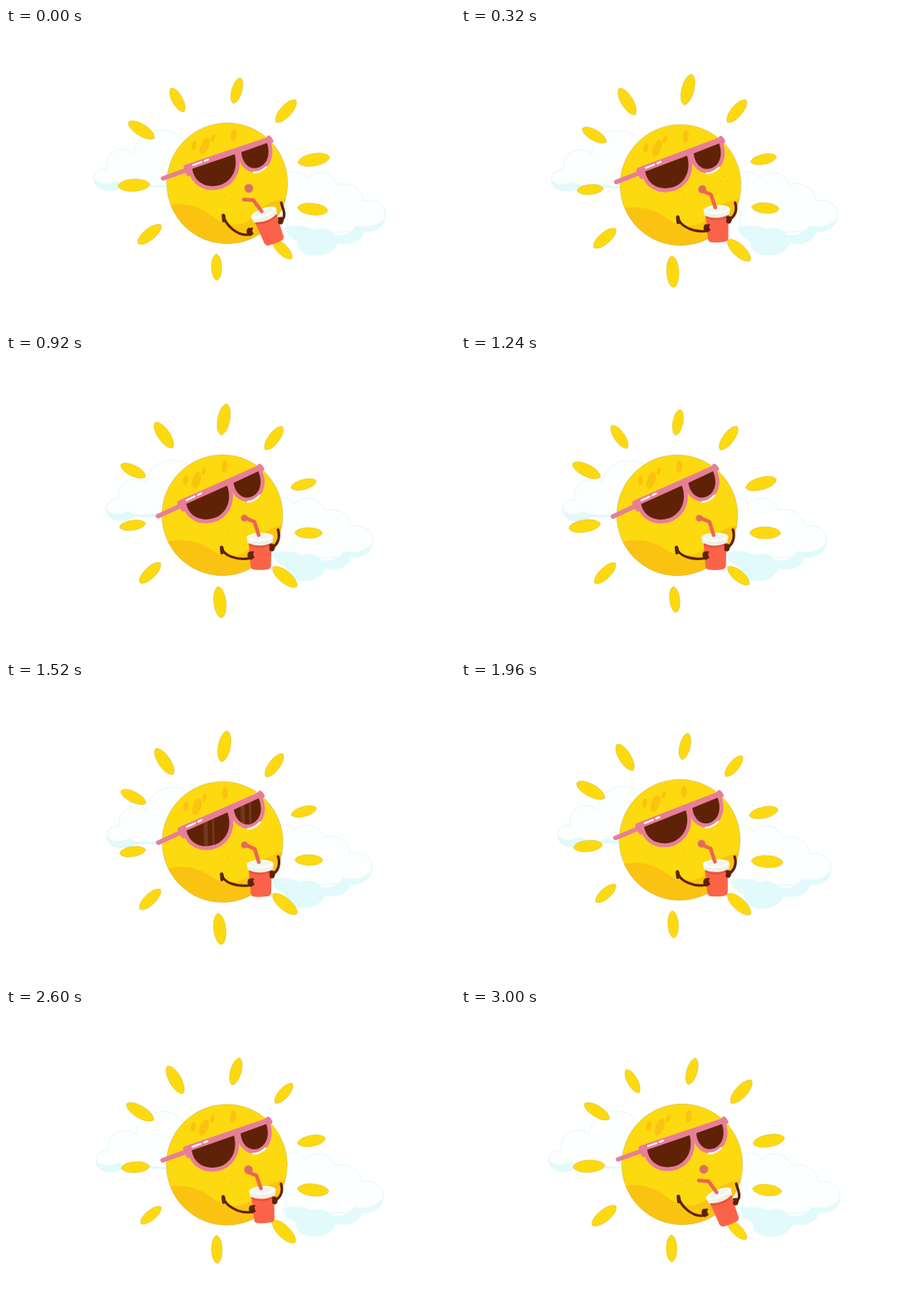
Animation, 540 px wide and 360 px high, one loop 3.04 s. Source, as an HTML page with a canvas:

```html
<!DOCTYPE html>
<html lang="en">
<head>
<meta charset="utf-8">
<title>Sipping sun</title>
<style>
html, body { margin: 0; width: 100%; height: 100%; overflow: hidden; background: #fff; }
canvas { display: block; width: 540px; height: 360px; }
</style>
</head>
<body>
<canvas id="stage"></canvas>
<script>
const LOOP = 3040, STEP = 40, TAU = Math.PI * 2;
const YELLOW = '#fdd90f', AMBER = '#fbc311', PINK = '#e77e98', BROWN = '#5f2206',
      RED = '#fb6349', STRAW = '#ee6451', ICE = '#e2fafc', RIM = '#d8f6f7', WHITE = '#fdfefe';

const canvas = document.getElementById('stage');
const ctx = canvas.getContext('2d');
const dpr = window.devicePixelRatio || 1;
canvas.width = 540 * dpr;
canvas.height = 360 * dpr;

const rad = d => d * Math.PI / 180;
const mix = (a, b, k) => a + (b - a) * k;
const clamp = x => Math.max(0, Math.min(1, x));
const smooth = x => { x = clamp(x); return x * x * (3 - 2 * x); };

// Smooth curve through [time, value] keys, at rest at both ends
function track(keys, t) {
  let i = 0;
  while (i < keys.length - 2 && t >= keys[i + 1][0]) i++;
  const slope = j => {
    if (j === 0 || j === keys.length - 1) return 0;
    const a = keys[j - 1], b = keys[j + 1];
    return (b[1] - a[1]) / (b[0] - a[0]);
  };
  const [t0, v0] = keys[i], [t1, v1] = keys[i + 1];
  const d = t1 - t0, u = (t - t0) / d, w = 1 - u;
  return v0 * (1 + 2 * u) * w * w + slope(i) * d * u * w * w
       + v1 * u * u * (3 - 2 * u) - slope(i + 1) * d * u * u * w;
}

const SWAY = [[0, 0], [320, .33], [920, .97], [1220, 1], [1520, .93], [1960, .5], [2240, .28], [2640, .07], [LOOP, 0]];
const DRIFT = [[0, 0], [320, .18], [600, .48], [920, .91], [1240, 1], [1520, .97], [1960, .65], [2240, .41], [2640, .12], [LOOP, 0]];

// Counter-clockwise from the top: inner end x, y and direction
const RAYS = [
  [7.2, -96.2, -74], [-52, -86.2, -119], [-87.7, -54.6, 211.6], [-93, 1.2, 177], [-79.5, 50.2, 141],
  [-13, 85, 89], [54.7, 67.7, 45], [84.8, 29.2, 6], [85.3, -25, -10], [58.8, -73.7, -48]
];

function placed(x, y, deg, draw) {
  ctx.save();
  ctx.translate(x, y);
  ctx.rotate(rad(deg));
  draw();
  ctx.restore();
}

function fill(d, color) {
  ctx.fillStyle = color;
  ctx.fill(new Path2D(d));
}

function line(d, color, width) {
  ctx.strokeStyle = color;
  ctx.lineWidth = width;
  ctx.stroke(new Path2D(d));
}

function oval(x, y, rx, ry, deg, color) {
  ctx.fillStyle = color;
  ctx.beginPath();
  ctx.ellipse(x, y, rx, ry, rad(deg), 0, TAU);
  ctx.fill();
}

const LEFT_CLOUD = 'M106 183 C105 174 112 169 121 170 C119 157 126 146 140 146 C147 146 151 148 154 151 C156 132 170 123 186 123 C204 123 216 134 216 150 L216 192 L140 190 C134 197 108 200 106 183Z';
const LEFT_SHADE = 'M106 182 C112 189 124 189 132 184 C142 190 158 190 166 186 C176 191 190 191 200 188 L200 192 L140 191 C134 197 108 200 106 182Z';
const RIGHT_CLOUD = 'M335 176 C345 171 357 173 362 181 C375 169 394 174 398 189 C414 184 429 194 430 208 C446 206 457 214 456 225 C456 238 444 244 430 244 L340 250Z';
const RIGHT_SHADE = 'M335 240 C350 237 362 238 370 243 C380 239 389 242 395 249 C407 251 417 246 421 238 C435 241 448 238 456 228 C456 239 444 247 430 246 C428 257 414 263 399 259 C395 270 383 275 371 274 C358 274 350 267 351 257 C344 255 338 250 335 240Z';

function drawClouds(k) {
  placed(16 * k, 4 * k, 0, () => {
    fill(LEFT_CLOUD, WHITE);
    fill(LEFT_SHADE, ICE);
    line(LEFT_CLOUD, RIM, .8);
  });
  placed(-16.5 * k, -2 * k, 0, () => {
    fill(RIGHT_CLOUD, WHITE);
    line(RIGHT_CLOUD, RIM, .8);
    fill(RIGHT_SHADE, ICE);
  });
}

function drawRays(t) {
  const beat = t / LOOP * 5;
  RAYS.forEach(([x, y, deg], i) => {
    const len = 35 + 3.5 * Math.cos(TAU * (beat - .58 + i * .2));
    const b = len * .26;
    const d = `M0 0 C${len * .08} ${-b} ${len * .92} ${-b} ${len} 0 C${len * .92} ${b} ${len * .08} ${b} 0 0Z`;
    placed(x, y, deg, () => {
      fill(d, YELLOW);
      line(d, 'rgba(190,165,60,.4)', .7);
    });
  });
}

const LENSES = [
  'M-42 -17.5 L9 -35 C13 -20 8 -4 -8 2 C-26 7 -40 -2 -42 -17.5Z',
  'M17 -37.5 L48 -48.5 C52 -36 49 -24 39 -19.5 C28 -15 18 -23 17 -37.5Z'
];

function drawGlasses(t) {
  line('M-77 -6 L-46 -17', PINK, 5.5);
  line('M50 -55 L53 -51', PINK, 5);
  line('M-49 -18 L-46 -12', PINK, 6.5);
  const sweep = (t - 1360) / 340;
  const glow = .15 * Math.sin(Math.PI * clamp(sweep));
  LENSES.forEach(d => line(d, PINK, 9.5));
  line('M-49 -19.5 L51 -53', PINK, 6.5);
  LENSES.forEach((d, i) => {
    fill(d, BROWN);
    if (glow <= 0) return;
    ctx.save();
    ctx.clip(new Path2D(d));
    const x = mix(-50, 12, sweep) + i * 45;
    line(`M${x} 15 L${x + 5} -60`, `rgba(235,180,150,${glow})`, 5);
    line(`M${x + 9} 15 L${x + 14} -60`, `rgba(235,180,150,${glow})`, 2.5);
    ctx.restore();
  });
  line('M-41 -22 L-31 -25.5 M-27 -27 L-23 -28.5', '#fff', 2.3);
  line('M32 -13 Q40 -13 47 -19.5', '#fff', 2.3);
}

function drawSun(t, sway) {
  drawRays(t);
  oval(0, 0, 72.7, 72.7, 0, YELLOW);
  ctx.save();
  ctx.clip();
  fill('M-75 27 C-54 22 -34 26 -16 41 C-2 53 22 53 34 38 C40 28 52 21 75 18 L75 80 L-75 80Z', AMBER);
  ctx.restore();
  ctx.strokeStyle = 'rgba(190,175,90,.55)';
  ctx.lineWidth = .8;
  ctx.beginPath();
  ctx.arc(0, 0, 72.7, 0, TAU);
  ctx.stroke();

  oval(-27, -45, 5, 10.5, 22, AMBER);
  oval(-40, -46, 3, 6, 12, AMBER);
  oval(-17, -55, 2.3, 4.5, 22, AMBER);
  oval(8, -58, 3.6, 7.5, 8, AMBER);
  [[-2, 16], [5, 19], [4, 12], [48, -4], [53, -9], [56, -2]].forEach(([x, y]) => oval(x, y, 1, 1, 0, '#f8c622'));

  drawGlasses(t);
  const r = mix(5.5, 4.3, sway);
  oval(26, 6, r, r, 0, '#e38a5c');
  oval(26, 6, r - 1, r - 1, 0, '#d96f62');
}

function drawCup() {
  fill('M-13.8 5 L13.8 5 L12.3 34 Q11.8 38 8 38.5 Q0 39.5 -8 38.5 Q-11.8 38 -12.3 34Z', RED);
  fill('M-13.8 7 Q0 13.5 13.8 7 L13.7 9 Q0 15.5 -13.7 9Z', '#e9503c');
  fill('M-16 0 L16 0 L15 6 Q0 13 -15 6Z', '#eff1e6');
  oval(0, -.5, 16, 5.3, 0, '#fbfdf7');
  oval(0, -1, 12.5, 3.2, 0, '#f0f5ee');
  line('M-1.5 -3 L-6 -19 L-16.5 -24', STRAW, 4.4);
}

function drawDrink(cx, cy, turn, sway, sip) {
  // Shoulders follow the turning body, hands follow the cup
  const at = (x, y) => {
    const a = rad(turn);
    return [cx + x * Math.cos(a) - y * Math.sin(a), cy + x * Math.sin(a) + y * Math.cos(a)];
  };
  const [lx, ly] = at(-4, 39), [rx, ry] = at(65, 23.5);
  const hx = mix(293, 296, sip) - 2 * sway, hy = mix(245.5, 241, sip) + .5 * sway;
  const gx = mix(330.5, 323.5, sip) - 3.5 * sway, gy = mix(232, 230.5, sip) + 1.5 * sway;
  line(`M${lx} ${ly} C${lx + 1} ${ly + 10} ${hx - 15} ${hy + 6} ${hx} ${hy + 3}`, BROWN, 3);
  line(`M${lx - .6} ${ly - .5} L${lx} ${ly + 6}`, BROWN, 4.2);
  line(`M${rx} ${ry} C${rx + 3} ${ry + 9} ${gx + 7} ${gy - 4} ${gx} ${gy}`, BROWN, 3.2);
  placed(mix(310, 308.6, sip) - 3.2 * sway, mix(223, 218.7, sip) + 1.2 * sway, mix(-21, -3.5, sip) + 2 * sway, drawCup);
  oval(hx, hy, 3.6, 5, -10, BROWN);
  line(`M${hx} ${hy - 3} L${hx + 3} ${hy - 4} M${hx} ${hy + 3} L${hx + 3.5} ${hy + 2}`, BROWN, 2.4);
  oval(gx, gy, 3.3, 4.6, 10, BROWN);
  line(`M${gx} ${gy - 3} L${gx - 2.5} ${gy - 3} M${gx} ${gy + 3} L${gx - 2} ${gy + 2}`, BROWN, 2.4);
}

function render(t) {
  const sway = track(SWAY, t);
  const sip = smooth(t / 300) * (1 - smooth((t - 2560) / 400));
  const cx = 266 - 6 * sway, cy = 187 + 6 * sway, turn = -5.5 * sway;
  ctx.setTransform(dpr, 0, 0, dpr, 0, 0);
  ctx.fillStyle = '#fff';
  ctx.fillRect(0, 0, 540, 360);
  ctx.lineCap = ctx.lineJoin = 'round';
  drawClouds(track(DRIFT, t));
  placed(cx, cy, turn, () => drawSun(t, sway));
  drawDrink(cx, cy, turn, sway, sip);
}

const start = performance.now();
function tick() {
  const t = (performance.now() - start) % LOOP;
  render(Math.floor(t / STEP) * STEP);
  requestAnimationFrame(tick);
}
tick();
</script>
</body>
</html>
```
